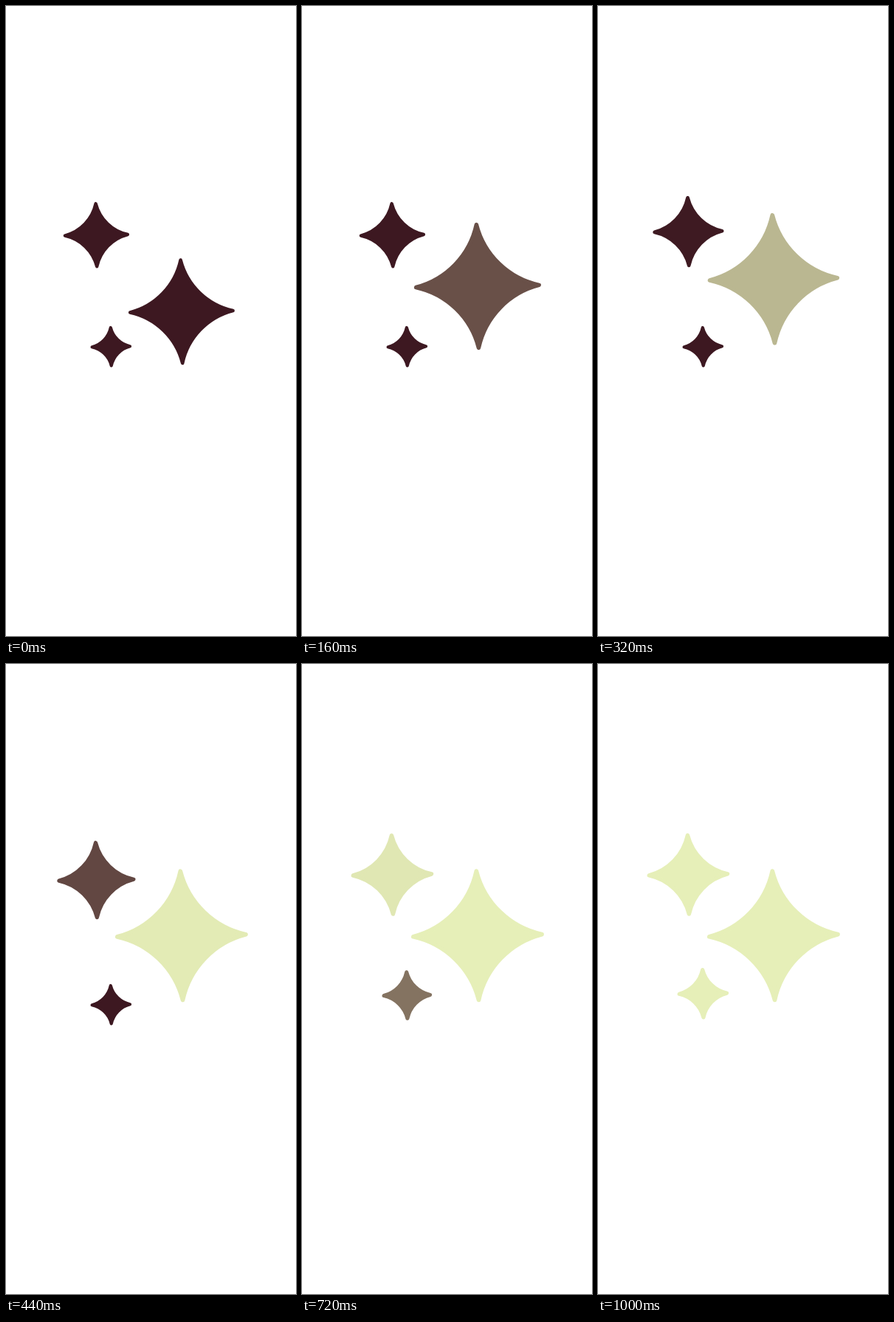
Recreate the animation shown at these times as an HTML page with a canvas. Size 393 px wide and 852 px high, loop 1.04 s.

```html
<!DOCTYPE html>
<html lang="en">
<head>
<meta charset="utf-8">
<title>Sparkles</title>
<style>
  html, body { margin: 0; width: 100%; height: 100%; overflow: hidden; background: #fff; }
  canvas { display: block; width: 393px; height: 852px; }
</style>
</head>
<body>
<canvas id="stage"></canvas>
<script>
const W = 393, H = 852;
const LOOP = 1040, STEP = 40, RISE = 480;
const DARK = [61, 24, 33], LIGHT = [230, 239, 184];
const GROW = 0.25;
const TILT = -1.05 * Math.PI / 180;
const TIP_ANGLE = 13.3 * Math.PI / 180;

// x, y: resting centre; r: outer radius; lift: upward travel; pen: outline width
const stars = [
  { x: 237.9, y: 413.2, r: 72, lift: 46, start: 0, pen: 4.6 },
  { x: 122.4, y: 309.8, r: 44.7, lift: 24.9, start: 295, pen: 4.4 },
  { x: 142.3, y: 460.7, r: 27.8, lift: 15, start: 505, pen: 4.2 }
];

const canvas = document.getElementById('stage');
const ctx = canvas.getContext('2d');
const dpr = window.devicePixelRatio || 1;
canvas.width = W * dpr;
canvas.height = H * dpr;

const clamp = v => Math.min(1, Math.max(0, v));
const smooth = u => u * u * (3 - 2 * u);

function bezierEase(x1, y1, x2, y2) {
  const at = (a, b, t) => 3 * (1 - t) * (1 - t) * t * a + 3 * (1 - t) * t * t * b + t * t * t;
  return x => {
    if (x <= 0 || x >= 1) return clamp(x);
    let lo = 0, hi = 1;
    for (let i = 0; i < 24; i++) {
      const mid = (lo + hi) / 2;
      if (at(x1, x2, mid) < x) lo = mid; else hi = mid;
    }
    return at(y1, y2, (lo + hi) / 2);
  };
}
const rise = bezierEase(0.15, 0.6, 0.36, 1);
const swell = bezierEase(0.05, 0.65, 0.4, 1);

function mix(a, b, k) {
  return `rgb(${a.map((v, i) => Math.round(v + (b[i] - v) * k)).join(',')})`;
}

// Four tips joined by inward circular arcs
function starPath(r) {
  const bend = Math.PI / 4 - TIP_ANGLE;
  const arc = r * Math.SQRT1_2 / Math.sin(bend);
  const reach = r * Math.SQRT1_2 + arc * Math.cos(bend);
  ctx.beginPath();
  for (let i = 0; i < 4; i++) {
    const dir = -Math.PI / 4 + i * Math.PI / 2;
    const back = dir + Math.PI;
    ctx.arc(reach * Math.cos(dir), reach * Math.sin(dir), arc, back + bend, back - bend, true);
  }
  ctx.closePath();
}

function drawStar(s, time) {
  const u = clamp((time - s.start) / RISE);
  const scale = 1 + GROW * swell(u);
  ctx.save();
  ctx.translate(s.x, s.y - s.lift * rise(u));
  ctx.rotate(TILT);
  ctx.scale(scale, scale);
  starPath(s.r - s.pen / 2);
  ctx.fillStyle = ctx.strokeStyle = mix(DARK, LIGHT, smooth(u));
  ctx.lineWidth = s.pen;
  ctx.lineJoin = 'round';
  ctx.fill();
  ctx.stroke();
  ctx.restore();
}

function render(time) {
  ctx.setTransform(dpr, 0, 0, dpr, 0, 0);
  ctx.fillStyle = '#fff';
  ctx.fillRect(0, 0, W, H);
  stars.forEach(s => drawStar(s, time));
}

const begin = performance.now();
function tick() {
  const t = (performance.now() - begin) % LOOP;
  render(Math.floor(t / STEP) * STEP);
  requestAnimationFrame(tick);
}
render(0);
requestAnimationFrame(tick);
</script>
</body>
</html>
```
